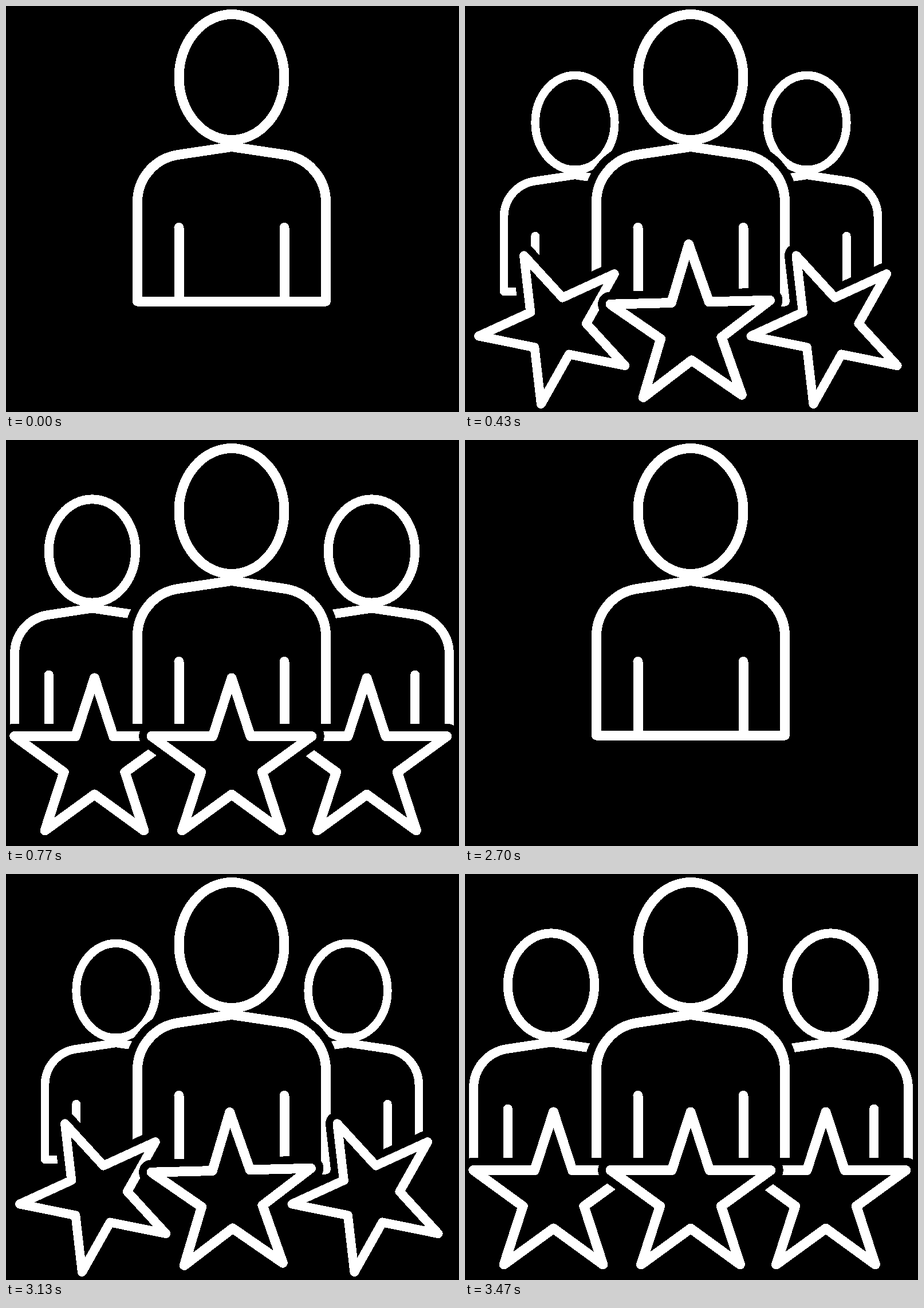
Write an HTML page that moves like this. It is 791 px wide and 708 px high and loops after 5410 ms.

```html
<!DOCTYPE html>
<html lang="en">
<head>
<meta charset="utf-8">
<title>Team rating</title>
<style>
  html, body { margin: 0; width: 100%; height: 100%; overflow: hidden; background: #000; }
  svg { display: block; width: 100%; height: 100%; }
  use { fill: #000; stroke-linejoin: round; stroke-linecap: round; }
  .halo { stroke: #000; stroke-width: 44px; }
  .line { stroke: #fff; stroke-width: 17px; }
  .side .line { stroke-width: 19.4px; }
</style>
</head>
<body>
<svg viewBox="0 0 791 708" shape-rendering="crispEdges">
  <defs>
    <!-- origin: centre of the head -->
    <g id="person">
      <path d="M0 121.5 L-94 135.5 C-135 142 -164.5 177 -164.5 218 V391 H164.5 V218
               C164.5 177 135 142 94 135.5 Z M-92 262.5 V391 M92 262.5 V391"/>
      <ellipse rx="92" ry="109.5"/>
    </g>
    <polygon id="star"/>
  </defs>
  <g class="side"><use href="#person" class="line"/></g>
  <g class="side"><use href="#person" class="line"/></g>
  <g transform="translate(394 124)">
    <use href="#person" class="halo"/><use href="#person" class="line"/>
  </g>
  <g class="star"><use href="#star" class="halo"/><use href="#star" class="line"/></g>
  <g class="star"><use href="#star" class="halo"/><use href="#star" class="line"/></g>
  <g class="star"><use href="#star" class="halo"/><use href="#star" class="line"/></g>
</svg>
<script>
const LOOP = 5410, SECOND_RUN = 2700, FPS = 30;
const sides = document.querySelectorAll('.side');
const stars = document.querySelectorAll('.star');

// Pentagram outline, its centre 14 below the pivot
const points = Array.from({ length: 10 }, (_, i) => {
  const r = i % 2 ? 56.15 : 147, a = i * Math.PI / 5;
  return [r * Math.sin(a), 14 - r * Math.cos(a)].map(v => v.toFixed(2));
});
document.getElementById('star').setAttribute('points', points.join(' '));

// Knots: [frame, value, slope]
const STAR_EASE = [[0, 0, .01], [4, .326, .17], [8, .891, .047], [13, .996, .002], [19, 1, 0]];
const PERSON_EASE = [[4, 0, 0], [8, .14, .1], [13, .83, .045], [17, .944, .019], [23, 1, 0]];

function ease(knots, frame) {
  if (frame <= knots[0][0]) return 0;
  const i = knots.findIndex(k => k[0] >= frame);
  if (i < 0) return 1;
  const [f0, v0, m0] = knots[i - 1], [f1, v1, m1] = knots[i];
  const d = f1 - f0, u = (frame - f0) / d, w = 1 - u;
  return v0 * w * w * (1 + 2 * u) + v1 * u * u * (3 - 2 * u) + d * u * w * (m0 * w - m1 * u);
}

function placePerson(el, dir, frame) {
  const p = ease(PERSON_EASE, frame);
  const x = 394.5 + dir * 244 * p, scale = .823 * (.5 + .5 * p);
  el.setAttribute('transform', `translate(${x} 310) scale(${scale}) translate(0 -141.6)`);
}

function placeStar(el, x, frame) {
  const q = ease(STAR_EASE, frame);
  el.style.display = q > 0 ? '' : 'none';
  el.setAttribute('transform', `translate(${x} 548) rotate(${360 * (q - 1)}) scale(${q})`);
}

function draw(now) {
  const t = now % LOOP;
  const local = t < SECOND_RUN ? t : t - SECOND_RUN;
  const frame = Math.floor((local + 4) * FPS / 1000);
  placePerson(sides[0], -1, frame);
  placePerson(sides[1], 1, frame);
  placeStar(stars[0], 154.5, frame - 4);
  placeStar(stars[1], 630, frame - 4);
  placeStar(stars[2], 394, frame);
}

let start;
function tick(now) {
  start ??= now;
  draw(now - start);
  requestAnimationFrame(tick);
}
draw(0);
requestAnimationFrame(tick);
</script>
</body>
</html>
```
